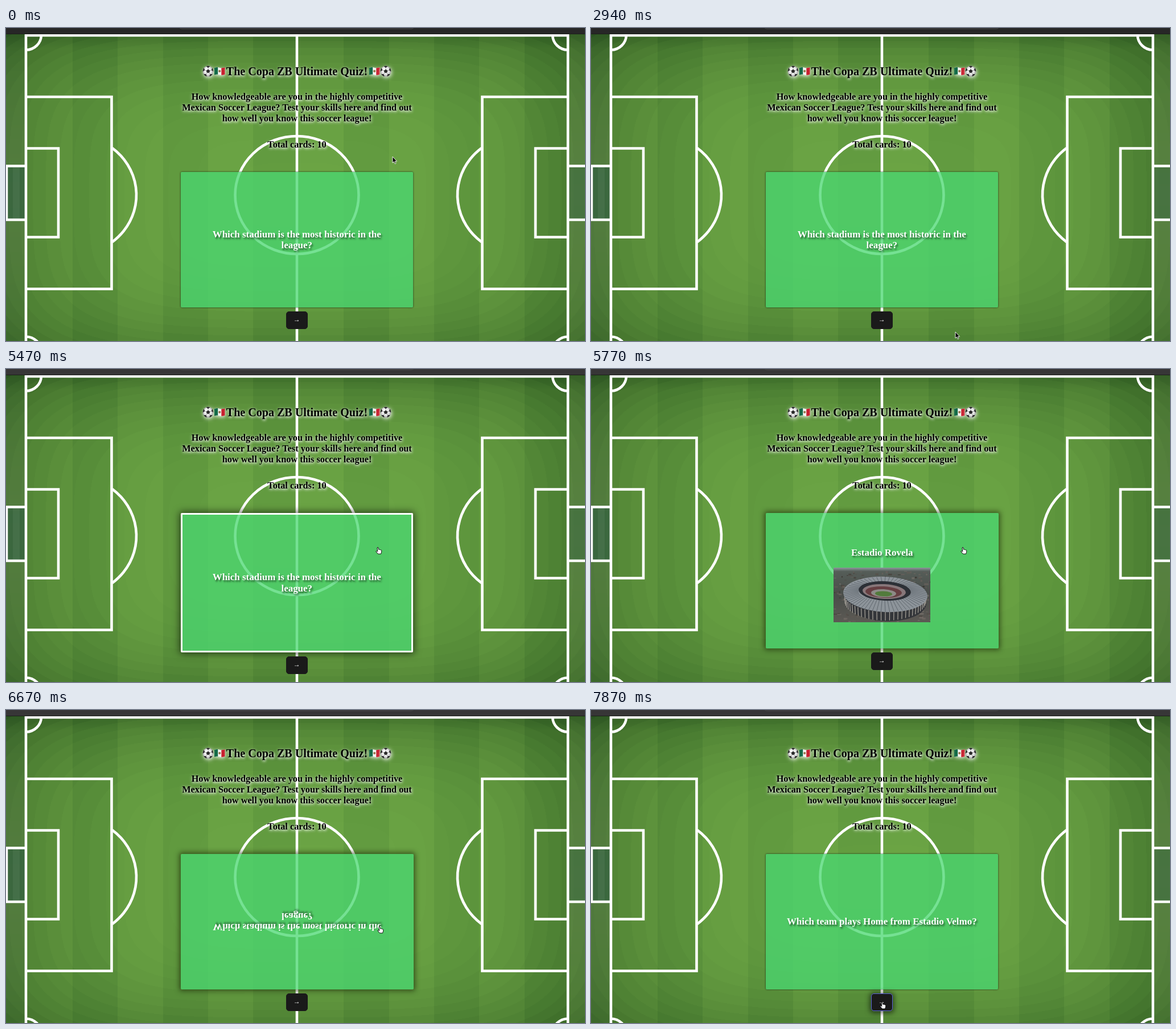
These frames come from a looping animation (1017x550 px, 8 s). An HTML page with a canvas:

```html
<!DOCTYPE html>
<html lang="en">
<head>
<meta charset="utf-8">
<title>Soccer quiz</title>
<style>
  html, body { margin: 0; width: 100%; height: 100%; overflow: hidden; }
  body { position: relative; background: #62993f; font: bold 16.95px/19.5px "Liberation Serif", Times, serif; }
  body > * { position: absolute; }
  #pitch { left: 0; top: 0; }
  #bar { left: 0; top: 0; width: 1017px; height: 11px; box-sizing: border-box; border-bottom: 1px solid #1d1f1b; overflow: hidden; }
  #bar i { position: absolute; left: 302px; top: -20px; width: 415px; height: 20px; border: 1px solid #474747; border-radius: 8px; }
  .head { left: 211px; width: 600px; text-align: center; white-space: nowrap; color: #000;
    text-shadow: 1px 2px 4px rgba(255,255,255,.85), 0 1px 6px rgba(255,255,255,.5); }
  #title { top: 65px; font-size: 20.06px; line-height: 23px; }
  #intro { top: 111px; font-size: 16.28px; line-height: 19.1px; }
  #total { top: 195px; font-size: 16.28px; line-height: 19.1px; }
  #card { left: 306.5px; top: 253px; width: 408.5px; height: 238px; box-sizing: border-box; border-radius: 2px;
    background: rgba(74,216,113,.76); color: #fff; text-align: center; text-shadow: 2px 3px 3px rgba(0,0,0,.5); }
  .face { position: absolute; inset: 0; display: flex; flex-direction: column; align-items: center; justify-content: center; white-space: nowrap; }
  #answer { box-sizing: border-box; padding-top: 14px; transform: scaleY(-1); }
  #photo { margin-top: 16.5px; }
  #next { left: 491.5px; width: 38.5px; height: 30.5px; box-sizing: border-box; border: 1px solid #1a1a1a; border-radius: 5px;
    background: #1a1a1a; color: #fff; text-align: center; font: 12px/27px "Liberation Sans", Arial, sans-serif; }
  #cursor { left: 0; top: 0; }
</style>
</head>
<body>
<canvas id="pitch" width="1017" height="550"></canvas>
<div id="bar"><i></i></div>
<div id="title" class="head">The Copa ZB Ultimate Quiz!</div>
<div id="intro" class="head">How knowledgeable are you in the highly competitive<br>Mexican Soccer League? Test your skills here and find out<br>how well you know this soccer league!</div>
<div id="total" class="head">Total cards: 10</div>
<div id="card">
  <div id="question" class="face"></div>
  <div id="answer" class="face"><div>Estadio Rovela</div><canvas id="photo" width="170" height="96"></canvas></div>
</div>
<div id="next">→</div>
<svg id="cursor" width="18" height="20" viewBox="-4 -2 18 20">
  <path id="arrow" d="M0 0V11L2.5 8.8L4.2 12.6L6 11.8L4.3 8.2H7.6Z" fill="#000" stroke="#fff" stroke-width=".9"/>
  <path id="hand" d="M-1 1Q0-.6 1 1L1.6 4.4Q2.6 3.5 3.4 4.6Q4.5 4 5 5.1Q6.6 4.8 6.8 6.4L6.4 9.4L5.5 12H.5L-3 8Q-3.2 6.4-1.6 6.8L-.2 8Z" fill="#fff" stroke="#111" stroke-width="1"/>
</svg>
<script>
const $ = id => document.getElementById(id);
const W = 1017, H = 550, LOOP = 8000, MIDX = 511, MIDY = 293.5;
const TAU = Math.PI * 2;

function drawGrass(g) {
  const img = g.createImageData(W, H);
  for (let y = 0; y < H; y++) {
    for (let x = 0; x < W; x++) {
      const u = ((x - MIDX) / 475) ** 4, v = ((y - MIDY) / 265) ** 4;
      const s = Math.round(Math.sqrt(u + v) * 11) / 11;
      const drop = s ** 1.6 + Math.max(0, 36 - y) / 60;
      const dark = Math.floor((x - 37) / 79.4) & 1 ? 1 : 0;
      let c = [107 - 24 * drop - 8 * dark, 164 - 30 * drop - 8 * dark, 68 - 14 * drop - 4 * dark];
      if (x < 35 || x > 987) {
        const k = .55 * Math.max(.2, 1 - Math.abs(y - MIDY) / 330);
        c = c.map((n, i) => n + ([95, 126, 78][i] - n) * k);
      }
      const p = (y * W + x) * 4;
      for (let i = 0; i < 3; i++) img.data[p + i] = c[i];
      img.data[p + 3] = 255;
    }
  }
  g.putImageData(img, 0, 0);
}

function drawLines(g) {
  g.fillStyle = 'rgba(25,75,60,.42)';
  g.fillRect(0, 242, 33, 95);
  g.fillStyle = 'rgba(25,75,60,.25)';
  g.fillRect(989, 242, 28, 95);
  g.fillStyle = 'rgba(255,255,255,.05)';
  g.fillRect(12, 242, 12, 95);

  g.strokeStyle = '#fff';
  g.lineWidth = 4.6;
  const line = (...p) => {
    g.beginPath();
    for (let i = 0; i < p.length; i += 2) g.lineTo(p[i], p[i + 1]);
    g.stroke();
  };
  const arc = (x, y, rx, ry, a, b) => {
    g.beginPath();
    g.ellipse(x, y, rx, ry, 0, a, b);
    g.stroke();
  };
  line(35, 560, 35, 13, 987, 13, 987, 560);
  line(MIDX, 13, MIDX, H);
  arc(MIDX, MIDY, 108.5, 103.5, 0, TAU);

  for (const side of [1, -1]) {
    const X = x => side > 0 ? x : 1022 - x;
    line(X(35), 121, X(185.5), 121, X(185.5), 458.5, X(35), 458.5);
    line(X(35), 211.5, X(92), 211.5, X(92), 367.5, X(35), 367.5);
    line(X(35), 242.5, X(1), 242.5, X(1), 337, X(35), 337);
    const a = Math.acos(66 / 108.5);
    if (side > 0) arc(120.5, MIDY, 108.5, 104, -a, a);
    else arc(X(120.5), MIDY, 108.5, 104, Math.PI - a, Math.PI + a);
    g.save();
    g.beginPath();
    g.rect(35, 13, 952, H);
    g.clip();
    arc(X(35), 12, 27, 26.5, 0, TAU);
    arc(X(35), 569, 27, 26.5, 0, TAU);
    g.restore();
  }
}

function halo(g) {
  g.shadowColor = 'rgba(255,255,255,.9)';
  g.shadowBlur = 7;
  g.shadowOffsetX = 1;
  g.shadowOffsetY = 2;
}

function poly(g, x, y, r, turn) {
  g.beginPath();
  for (let i = 0; i < 5; i++) {
    const a = turn + i * TAU / 5;
    g.lineTo(x + r * Math.cos(a), y + r * Math.sin(a));
  }
  g.closePath();
  g.fill();
}

function drawBall(g, x, y) {
  const r = 9.4;
  g.save();
  halo(g);
  const shade = g.createRadialGradient(x - 2, y - 3, 1, x, y, r);
  shade.addColorStop(0, '#fff');
  shade.addColorStop(.7, '#e2e2e2');
  shade.addColorStop(1, '#9a9a9a');
  g.fillStyle = shade;
  g.beginPath();
  g.arc(x, y, r, 0, TAU);
  g.fill();
  g.shadowColor = 'transparent';
  g.clip();
  g.fillStyle = '#2b2b2b';
  g.strokeStyle = '#888';
  g.lineWidth = .7;
  poly(g, x, y, 3.5, -Math.PI / 2);
  for (let i = 0; i < 5; i++) {
    const a = -Math.PI / 2 + i * TAU / 5, c = Math.cos(a), s = Math.sin(a);
    g.beginPath();
    g.moveTo(x + 3 * c, y + 3 * s);
    g.lineTo(x + 7 * c, y + 7 * s);
    g.stroke();
    poly(g, x + 9.4 * c, y + 9.4 * s, 3.3, a + Math.PI);
  }
  g.restore();
}

function drawFlag(g, x, y) {
  const shape = () => {
    g.beginPath();
    g.moveTo(x, y + 1);
    g.quadraticCurveTo(x + 5, y - 1, x + 9, y + .7);
    g.quadraticCurveTo(x + 14, y + 2, x + 18.5, y);
    g.lineTo(x + 18.5, y + 12.5);
    g.quadraticCurveTo(x + 14, y + 14.5, x + 9, y + 13.2);
    g.quadraticCurveTo(x + 5, y + 11.7, x, y + 13.5);
    g.closePath();
  };
  g.save();
  halo(g);
  g.fillStyle = '#f4f4f2';
  shape();
  g.fill();
  g.shadowColor = 'transparent';
  g.clip();
  g.fillStyle = '#146b48';
  g.fillRect(x, y - 2, 6.2, 18);
  g.fillStyle = '#c8202f';
  g.fillRect(x + 12.3, y - 2, 7, 18);
  g.fillStyle = '#95764c';
  g.beginPath();
  g.arc(x + 9.2, y + 6.8, 2.1, 0, TAU);
  g.fill();
  g.restore();
}

function drawPhoto(g) {
  const oval = (x, y, rx, ry, fill) => {
    g.beginPath();
    g.ellipse(x, y, rx, ry, .05, 0, TAU);
    g.fillStyle = fill;
    g.fill();
  };
  let seed = 7;
  const rand = () => (seed = seed * 16807 % 2147483647) / 2147483647;
  const ground = g.createLinearGradient(0, 0, 0, 96);
  ground.addColorStop(0, '#8d979c');
  ground.addColorStop(.07, '#555d58');
  ground.addColorStop(.5, '#494d49');
  ground.addColorStop(1, '#5c5954');
  g.fillStyle = ground;
  g.fillRect(0, 0, 170, 96);
  for (let i = 0; i < 230; i++) {
    const n = 45 + rand() * 75;
    g.fillStyle = `rgba(${n + 8},${n},${n - 6},.65)`;
    g.fillRect(rand() * 170, 6 + rand() * 90, 2 + rand() * 6, 1 + rand() * 2.5);
  }
  oval(91, 60, 72, 34, '#34363a');
  g.strokeStyle = '#aaa69d';
  g.lineWidth = 1.2;
  for (let i = 1; i < 30; i++) {
    const a = Math.PI * i / 30, c = Math.cos(a), s = Math.sin(a);
    g.beginPath();
    g.moveTo(91 + 72 * c, 48 + 29 * s);
    g.lineTo(91 + 71 * c, 60 + 33 * s);
    g.stroke();
  }
  oval(91, 47, 74, 31, '#8d949a');
  g.strokeStyle = 'rgba(55,62,70,.65)';
  g.lineWidth = .8;
  for (let i = 0; i < 60; i++) {
    const a = TAU * i / 60;
    g.beginPath();
    g.moveTo(90 + 46 * Math.cos(a), 42 + 16 * Math.sin(a));
    g.lineTo(91 + 74 * Math.cos(a), 47 + 31 * Math.sin(a));
    g.stroke();
  }
  oval(90, 41, 46, 17, '#2c3036');
  oval(89, 42, 38, 13, '#87777a');
  oval(88, 43, 32, 10, '#663f42');
  oval(88, 45, 22, 7, '#8d8b87');
  oval(88, 46, 15, 4.5, '#527b3c');
}

// time, x, y of the pointer tip
const path = [
  [-10, 679, 226], [440, 665, 343], [590, 665, 343], [740, 665, 344], [890, 665, 344],
  [1040, 665, 356], [1190, 662, 350], [2940, 640, 534], [3520, 700, 320], [3970, 685, 178],
  [4120, 685, 178], [4720, 653, 313], [5770, 653, 313], [6370, 656, 380], [6970, 656, 380],
  [7420, 511, 513]
];

function pointer(q) {
  const i = path.findIndex(k => k[0] > q);
  if (i < 0) return path[path.length - 1].slice(1);
  const [t0, x0, y0] = path[Math.max(0, i - 1)], [t1, x1, y1] = path[i];
  const f = Math.max(0, (q - t0) / (t1 - t0));
  return [Math.round(x0 + (x1 - x0) * f), Math.round(y0 + (y1 - y0) * f)];
}

// the screen refreshes every 150 ms
function tick(t) {
  const lead = t < 2000 ? 10 : t < 3300 ? 60 : 80;
  return Math.floor((t + lead) / 150) * 150 - lead;
}

function angle(q) {
  if (q < 5620) return 0;
  if (q < 5770) return 55;
  if (q < 6820) return 180;
  return q < 6970 ? 40 : 0;
}

const ASK = ['Which stadium is the most historic in the<br>league?', 'Which team plays Home from Estadio Velmo?'];
let asked = -1;

function render(t) {
  const q = tick(t), [x, y] = pointer(q);
  const active = q > 4000;
  const over = active && y > 253 && y < 491;
  const onNext = active && y >= 498;
  const pressed = q === 5470 || q === 6520;
  const answered = q >= 5620 && q < 6670;

  $('bar').style.background = q < 3200 ? '#272727' : '#373637';

  const card = $('card').style, deg = angle(q);
  card.height = pressed ? '245px' : '238px';
  card.border = pressed ? '3.4px solid #fff' : '0';
  card.boxShadow = pressed ? '0 0 13px 2px rgba(0,0,0,.6)'
    : over ? '0 0 8px 3px rgba(20,30,0,.55)' : '0 0 3px rgba(0,0,0,.75)';
  card.transform = deg ? `perspective(800px) rotateX(${deg}deg)` : 'none';
  $('answer').style.visibility = answered ? 'visible' : 'hidden';
  $('question').style.visibility = answered ? 'hidden' : 'visible';
  const n = q >= 7720 ? 1 : 0;
  if (n !== asked) $('question').innerHTML = `<div>${ASK[asked = n]}</div>`;

  const next = $('next').style;
  next.top = pressed ? '505px' : '498px';
  next.borderColor = onNext ? '#5a62d8' : '#1a1a1a';
  next.boxShadow = onNext ? '0 1px 9px 3px rgba(0,0,0,.5)' : 'none';

  const hand = over || onNext;
  $('cursor').style.transform = `translate(${x - 4}px,${y - 2}px)`;
  $('cursor').style.visibility = q < 1340 || q >= 2940 ? 'visible' : 'hidden';
  $('arrow').style.display = hand ? 'none' : '';
  $('hand').style.display = hand ? '' : 'none';
}

const g = $('pitch').getContext('2d');
drawGrass(g);
drawLines(g);
drawBall(g, 355, 76);
drawFlag(g, 366, 69);
drawFlag(g, 638, 69);
drawBall(g, 667, 76);
drawPhoto($('photo').getContext('2d'));

const start = performance.now();
function frame() {
  render((performance.now() - start) % LOOP);
  requestAnimationFrame(frame);
}
frame();
</script>
</body>
</html>
```
